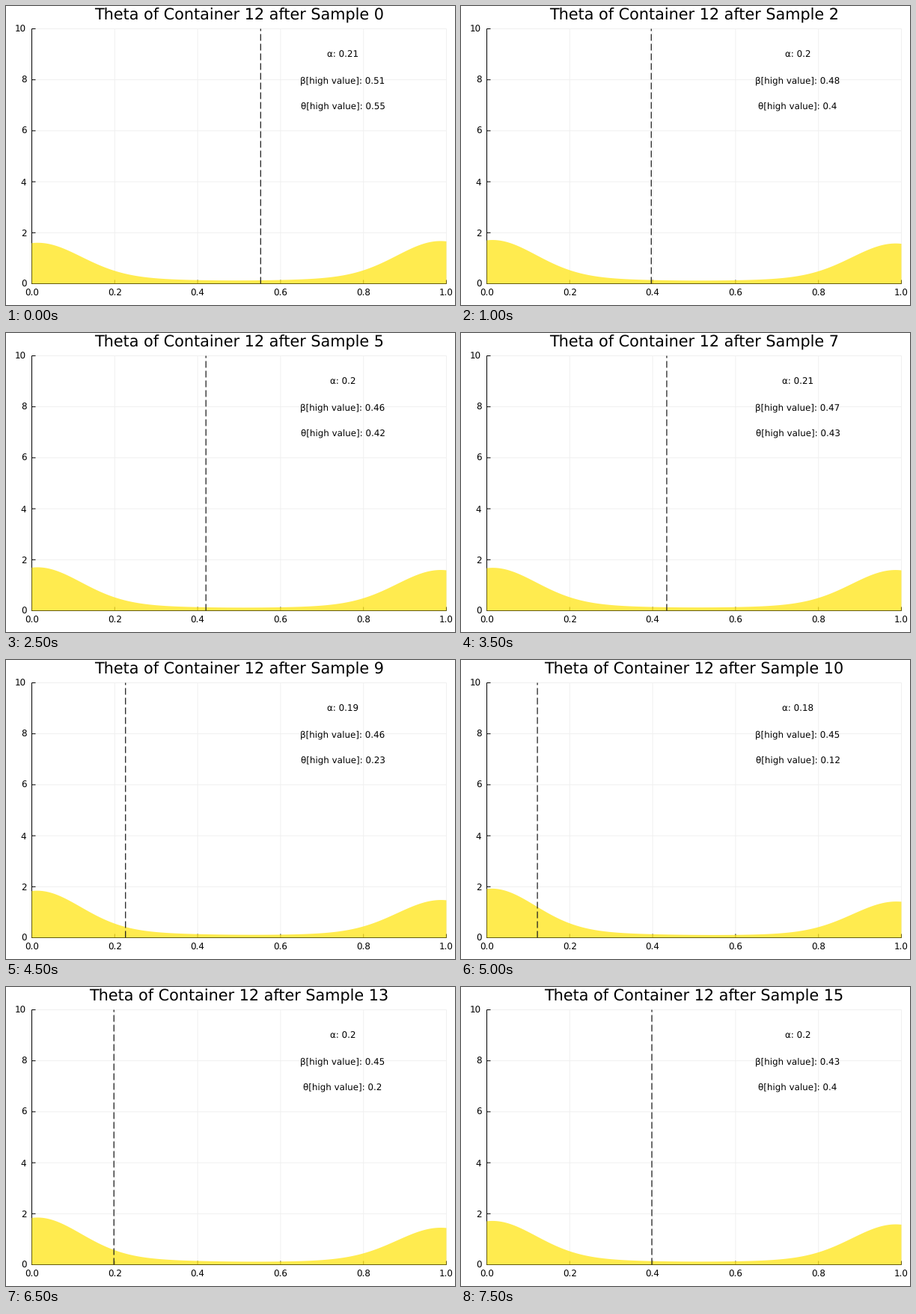
A matplotlib script that plays this animation: 600x400 px, repeating every 8 s.

```python
import numpy as np
import matplotlib.pyplot as plt
from matplotlib.animation import FuncAnimation

plt.rcParams.update({"font.family": "DejaVu Sans", "text.hinting": "none"})

W, H, DPI = 600, 400, 100
LEFT, RIGHT, TOP, BOTTOM = 34.5, 588.5, 30.5, 371.5
FRAMES, INTERVAL = 16, 500
SMALL, LARGE = 11.9, 20.8
BANDWIDTH = 0.105

# Key poses: sample, alpha, beta, theta
KEYS = [
    (0, 0.21, 0.51, 0.552),
    (3, 0.20, 0.47, 0.319),
    (5, 0.20, 0.46, 0.420),
    (7, 0.21, 0.47, 0.434),
    (10, 0.18, 0.45, 0.122),
    (13, 0.20, 0.45, 0.198),
    (15, 0.20, 0.43, 0.398),
]


def pose(n):
    samples, *tracks = zip(*KEYS)
    return [float(np.interp(n, samples, track)) for track in tracks]


def px(x):
    return LEFT + x * (RIGHT - LEFT)


def py(y):
    return BOTTOM - y * (BOTTOM - TOP) / 10


def smooth(x, points):
    """Gaussian kernel density of the points."""
    z = (x[:, None] - points) / BANDWIDTH
    return np.exp(-z * z / 2).mean(axis=1) / (BANDWIDTH * np.sqrt(2 * np.pi))


def density(x, alpha, theta):
    """Smoothed U-shaped beta prior, leaning towards theta."""
    u = (np.arange(400) + 0.5) / 400
    tail = 0.5 * u ** (2 / alpha)
    weight = 0.4 + 0.2 * theta
    return (1 - weight) * smooth(x, tail) + weight * smooth(x, 1 - tail)


fig = plt.figure(figsize=(W / DPI, H / DPI), dpi=DPI, facecolor="white")
ax = fig.add_axes([0, 0, 1, 1])
ax.set_xlim(0, W)
ax.set_ylim(H, 0)
ax.axis("off")


def line(xs, ys, color="black", z=1):
    ax.plot(xs, ys, color=color, lw=0.72, zorder=z, snap=False,
            solid_capstyle="butt")


def label(x, y, text="", size=SMALL, ha="center"):
    return ax.text(x, y, text, size=size * 72 / DPI, ha=ha, va="baseline",
                   color="black", zorder=5)


for k in range(6):
    x, y = px(k / 5), py(2 * k)
    line([x, x], [TOP, BOTTOM], "#f0f0f0", 0)
    line([LEFT, RIGHT], [y, y], "#f0f0f0", 0)
    line([x, x], [BOTTOM, BOTTOM - 5])
    line([LEFT, LEFT + 5], [y, y])
    label(x, 387.5, f"{k / 5:.1f}")
    label(27.3, y + 4.4, str(2 * k), ha="right")
line([LEFT, LEFT], [TOP, BOTTOM])
line([LEFT, RIGHT], [BOTTOM, BOTTOM])

grid = np.linspace(0, 1, 278)
area, = ax.fill([0, 1, 1], [0, 0, 1], color=(1, 0.906, 0.137), alpha=0.8,
                lw=0, zorder=2, snap=False)
marker, = ax.plot([], [], color="#1c1c1c", lw=0.9, zorder=3, snap=False,
                  dashes=(9 / 1.25, 4 / 1.25), dash_capstyle="butt")
title = label((LEFT + RIGHT) / 2, 18.4, size=LARGE)
notes = [label(px(0.75), py(y) + 4.4) for y in (9, 8, 7)]


def update(n):
    alpha, beta, theta = pose(n)
    xs = np.concatenate([[0], grid, [1]])
    ys = np.concatenate([[0], density(grid, alpha, theta), [0]])
    area.set_xy(np.column_stack([px(xs), py(ys)]))
    marker.set_data([px(theta)] * 2, [BOTTOM, TOP])

    title.set_text(f"Theta of Container 12 after Sample {n}")
    names = ("α", "β[high value]", "θ[high value]")
    for note, name, value in zip(notes, names, (alpha, beta, theta)):
        note.set_text(f"{name}: {round(value, 2)}")
    return [area, marker, title, *notes]


anim = FuncAnimation(fig, update, frames=FRAMES, interval=INTERVAL,
                     repeat=True, repeat_delay=0, blit=False)
plt.show()
```
